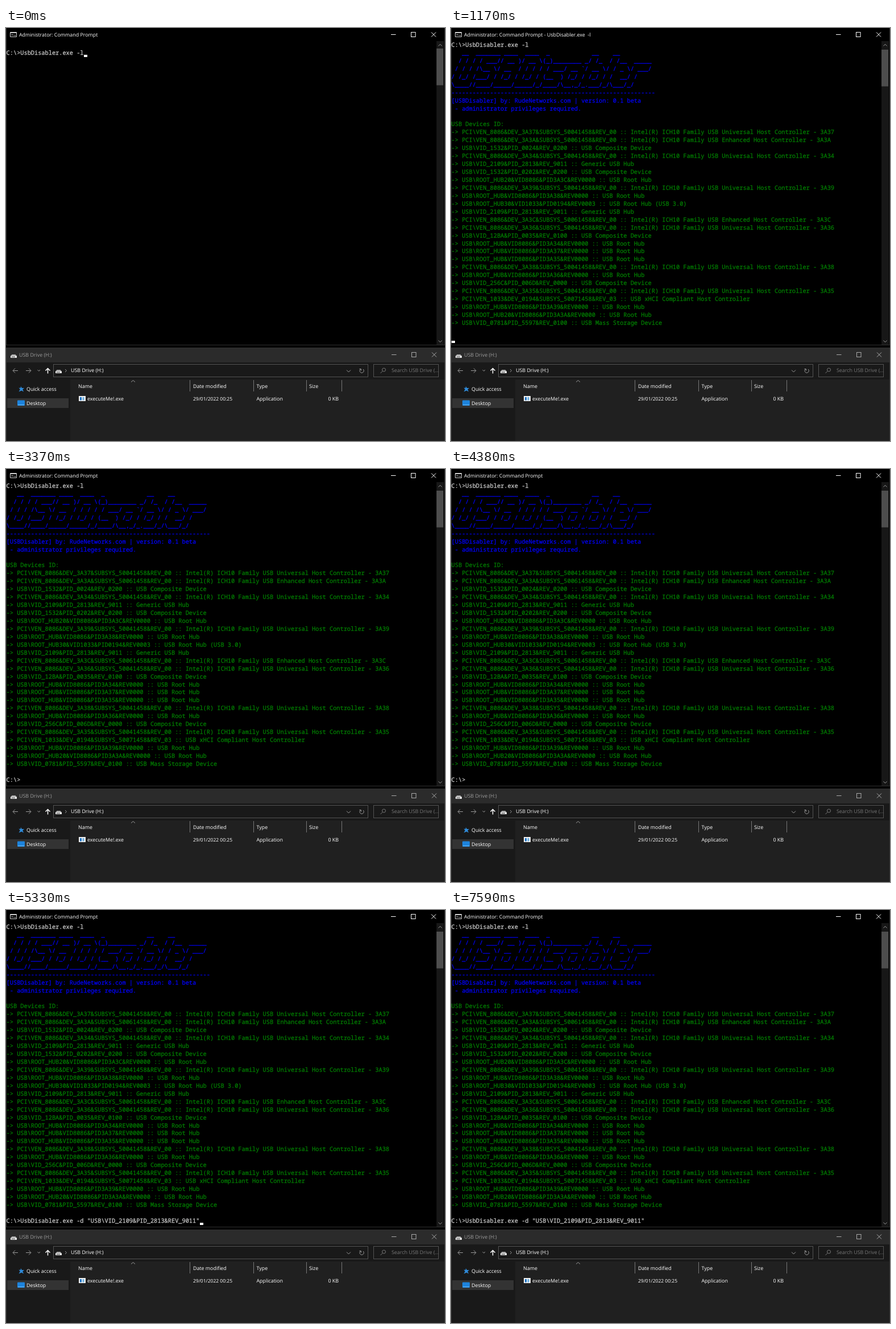
An HTML page that plays this animation: 772x725 px, repeating every 8000 ms.

```html
<!DOCTYPE html>
<html lang="en">
<head>
<meta charset="utf-8">
<title>Console and drive window</title>
<style>
  html, body { margin: 0; width: 100%; height: 100%; overflow: hidden; background: #000; }
  svg { position: absolute; left: 0; top: 0; }
  svg, pre { text-rendering: geometricPrecision; }
  svg text { font: 8.9px "Open Sans", "Noto Sans", sans-serif; fill: #fff; font-variant-ligatures: none; }
  svg .dim { fill: #9b9b9b; }
  .line { fill: none; stroke: #fff; }
  .gray { stroke: #9b9b9b; }
  pre {
    position: absolute; left: .6px; top: 24.1px; margin: 0; color: #ccc;
    font: 10.317px/13.94px "Noto Sans Mono", "DejaVu Sans Mono", monospace;
    font-variant-ligatures: none; -webkit-text-stroke: .25px;
  }
  #report { color: #008000; }
  #report b { color: #ccc; font-weight: normal; }
  #report i { color: #00f; font-style: normal; }
  #cursor { position: absolute; width: 6px; height: 4px; background: #fff; }
</style>
</head>
<body>
<svg width="772" height="725" viewBox="0 0 772 725">
  <defs>
    <g id="drive">
      <path d="M2.5 1.5H8.5L11 4.5H0Z" fill="#a8a8a8"/>
      <rect y="4" width="11" height="3.5" rx=".5" fill="#eee"/>
      <path d="M1.5 5.8H8" stroke="#333"/>
    </g>
    <g id="buttons" class="line">
      <path d="M0 4.5H8.5M71 .5L79 8.5M79 .5L71 8.5"/>
      <rect x="35.5" y=".5" width="7.5" height="8"/>
    </g>
  </defs>

  <!-- console window -->
  <path d="M.5 0V556.5H771.5V0" fill="none" stroke="#303030"/>
  <rect x="7" y="7" width="12" height="9" rx="1" fill="#d0d0d0"/>
  <rect x="8" y="9" width="10" height="6" fill="#000"/>
  <path d="M9.5 12H12M13 12.5H14M15 13H17" stroke="#fff"/>
  <text id="title" x="23" y="14.8"></text>
  <use href="#buttons" x="677" y="7"/>
  <rect x="757" y="23" width="13" height="533" fill="#171717"/>
  <rect id="thumb" x="757" width="12" height="64.5" fill="#4d4d4d"/>
  <path class="line gray" d="M760.5 31.5L763.5 28.5L766.5 31.5M760.5 548.5L763.5 551.5L766.5 548.5"/>

  <!-- drive window -->
  <rect y="561" width="772" height="164" fill="#202020"/>
  <rect y="561" width="772" height="26" fill="#2b2b2b"/>
  <rect y="587" width="772" height="30" fill="#191919"/>
  <rect y="617" width="113" height="108" fill="#191919"/>
  <path d="M.5 725V561.5H771.5V725" fill="none" stroke="#303030"/>
  <use href="#drive" x="8" y="571.5"/>
  <text class="dim" x="23" y="577.3">USB Drive (H:)</text>
  <use href="#buttons" x="678" y="569" style="stroke:#9b9b9b" opacity=".6"/>

  <g class="line gray">
    <path d="M21 601.5H12.5M16 597.5L12 601.5L16 605.5M35 601.5H43.5M40 597.5L44 601.5L40 605.5"/>
    <path d="M55.5 600L57.8 602.3L60 600M104 599L106.5 601.5L104 604M599 600.5L602.5 604L606 600.5"/>
    <path d="M624 598.5A3.6 3.6 0 1 0 628 599M624.5 598.5V601.5M624 598.5H621.5"/>
    <path d="M220 621.5L223.5 618.5L227 621.5"/>
  </g>
  <path class="line" stroke-width="1.5" d="M73.5 606.5V598M69.5 601.5L73.5 597.5L77.5 601.5"/>
  <g fill="none" stroke="#535353">
    <rect x="83.5" y="590.5" width="553" height="22"/>
    <rect x="646.5" y="590.5" width="114" height="22"/>
  </g>
  <use href="#drive" x="87" y="598.5"/>
  <text x="114" y="604.3">USB Drive (H:)</text>
  <g fill="none" stroke="#777"><circle cx="664.5" cy="600" r="3"/><path d="M662.3 602.2L658.5 606"/></g>
  <text x="678" y="604.3" style="fill:#777">Search USB Drive (...</text>

  <rect x="2" y="650" width="108" height="17" fill="#333"/>
  <path d="M26 629L28 632L32 632L29.3 634.5L31 638.5L27.3 636.5L22.5 638.5L24.8 634.5L22.5 631.5L25.5 632Z" fill="#2f8ad8"/>
  <text x="36" y="636.7">Quick access</text>
  <rect x="20" y="653.5" width="13" height="9.5" rx="1" fill="#1d83dc"/>
  <path d="M21 661.5H32" stroke="#65b8f5"/>
  <text x="36" y="661.7">Desktop</text>

  <path d="M323.5 618V638M435.5 618V638M528.5 618V638M590.5 618V638" stroke="#777"/>
  <text x="127" y="631.5">Name</text>
  <text x="329" y="631.5">Date modified</text>
  <text x="440.5" y="631.5">Type</text>
  <text x="533" y="631.5">Size</text>
  <rect x="128" y="646" width="12" height="9" fill="#f0f0f0"/>
  <path d="M131.5 648V653.5" stroke="#1d72c4" stroke-width="3"/>
  <path d="M136 648V653.5" stroke="#6aaede" stroke-width="3"/>
  <text x="143" y="653.8">executeMe!.exe</text>
  <text x="329" y="653.8" style="font-size:8.5px">29/01/2022 00:25</text>
  <text x="440.5" y="653.8">Application</text>
  <text x="585" y="653.8" text-anchor="end">0 KB</text>
</svg>

<pre id="report"><b>C:\>UsbDisabler.exe -l</b>
<i>   __  _______ ____  ____  _            __    __
  / / / / ___// __ )/ __ \(_)________ _/ /_  / /__  _____
 / / / /\__ \/ __  / / / / / ___/ __ `/ __ \/ / _ \/ ___/
/ /_/ /___/ / /_/ / /_/ / (__  ) /_/ / /_/ / /  __/ /
\____//____/_____/_____/_/____/\__,_/_.___/_/\___/_/
----------------------------------------------------------
[USBDisabler] by: RudeNetworks.com | version: 0.1 beta
 - administrator privileges required.</i>

USB Devices ID:
-> PCI\VEN_8086&DEV_3A37&SUBSYS_50041458&REV_00 :: Intel(R) ICH10 Family USB Universal Host Controller - 3A37
-> PCI\VEN_8086&DEV_3A3A&SUBSYS_50061458&REV_00 :: Intel(R) ICH10 Family USB Enhanced Host Controller - 3A3A
-> USB\VID_1532&PID_0024&REV_0200 :: USB Composite Device
-> PCI\VEN_8086&DEV_3A34&SUBSYS_50041458&REV_00 :: Intel(R) ICH10 Family USB Universal Host Controller - 3A34
-> USB\VID_2109&PID_2813&REV_9011 :: Generic USB Hub
-> USB\VID_1532&PID_0202&REV_0200 :: USB Composite Device
-> USB\ROOT_HUB20&VID8086&PID3A3C&REV0000 :: USB Root Hub
-> PCI\VEN_8086&DEV_3A39&SUBSYS_50041458&REV_00 :: Intel(R) ICH10 Family USB Universal Host Controller - 3A39
-> USB\ROOT_HUB&VID8086&PID3A38&REV0000 :: USB Root Hub
-> USB\ROOT_HUB30&VID1033&PID0194&REV0003 :: USB Root Hub (USB 3.0)
-> USB\VID_2109&PID_2813&REV_9011 :: Generic USB Hub
-> PCI\VEN_8086&DEV_3A3C&SUBSYS_50061458&REV_00 :: Intel(R) ICH10 Family USB Enhanced Host Controller - 3A3C
-> PCI\VEN_8086&DEV_3A36&SUBSYS_50041458&REV_00 :: Intel(R) ICH10 Family USB Universal Host Controller - 3A36
-> USB\VID_12BA&PID_0035&REV_0100 :: USB Composite Device
-> USB\ROOT_HUB&VID8086&PID3A34&REV0000 :: USB Root Hub
-> USB\ROOT_HUB&VID8086&PID3A37&REV0000 :: USB Root Hub
-> USB\ROOT_HUB&VID8086&PID3A35&REV0000 :: USB Root Hub
-> PCI\VEN_8086&DEV_3A38&SUBSYS_50041458&REV_00 :: Intel(R) ICH10 Family USB Universal Host Controller - 3A38
-> USB\ROOT_HUB&VID8086&PID3A36&REV0000 :: USB Root Hub
-> USB\VID_256C&PID_006D&REV_0000 :: USB Composite Device
-> PCI\VEN_8086&DEV_3A35&SUBSYS_50041458&REV_00 :: Intel(R) ICH10 Family USB Universal Host Controller - 3A35
-> PCI\VEN_1033&DEV_0194&SUBSYS_50071458&REV_03 :: USB xHCI Compliant Host Controller
-> USB\ROOT_HUB&VID8086&PID3A39&REV0000 :: USB Root Hub
-> USB\ROOT_HUB20&VID8086&PID3A3A&REV0000 :: USB Root Hub
-> USB\VID_0781&PID_5597&REV_0100 :: USB Mass Storage Device</pre>
<pre id="prompt"></pre>
<div id="cursor"></div>

<script>
  const LOOP = 8000, ENTER = 1080, LISTED = 1170, DONE = 1240, PASTE = 5330;
  const CELL_W = 6.19, CELL_H = 13.94, TOP = 24.1;
  const BLINKS = [150, 680, 2250, 2800, 3370, 3830, 4380, 4930, 5410, 5940, 6490, 7040, 7590];
  const LIST_COMMAND = 'C:\\>UsbDisabler.exe -l';
  const DISABLE_COMMAND = 'C:\\>UsbDisabler.exe -d "USB\\VID_2109&PID_2813&REV_9011"';
  const [title, thumb, report, prompt, cursor] =
    ['title', 'thumb', 'report', 'prompt', 'cursor'].map(id => document.getElementById(id));

  function promptAt(t) {
    if (t < LISTED) return LIST_COMMAND;
    if (t < DONE) return '';
    return t < PASTE ? 'C:\\>' : DISABLE_COMMAND;
  }

  function setText(node, text) {
    if (node.textContent !== text) node.textContent = text;
  }

  function draw(now) {
    const t = now % LOOP;
    const listed = t >= LISTED;
    const waiting = t >= ENTER && !listed;
    const line = promptAt(t);
    const top = TOP + CELL_H * (listed ? 37 : 1);

    setText(title, 'Administrator: Command Prompt' +
      (listed && t < DONE ? ' - UsbDisabler.exe\u00a0 -l' : ''));
    thumb.setAttribute('y', listed ? 38 : 36);
    report.style.visibility = listed ? 'visible' : 'hidden';
    setText(prompt, line);
    prompt.style.top = top + 'px';

    const column = waiting ? 0 : line.length;
    cursor.style.left = .6 + CELL_W * column + 'px';
    cursor.style.top = top + 8.96 + (waiting ? CELL_H : 0) + 'px';
    const toggles = BLINKS.filter(b => b <= t).length;
    cursor.style.visibility = toggles % 2 ? 'hidden' : 'visible';
    requestAnimationFrame(draw);
  }
  draw(0);
</script>
</body>
</html>
```
